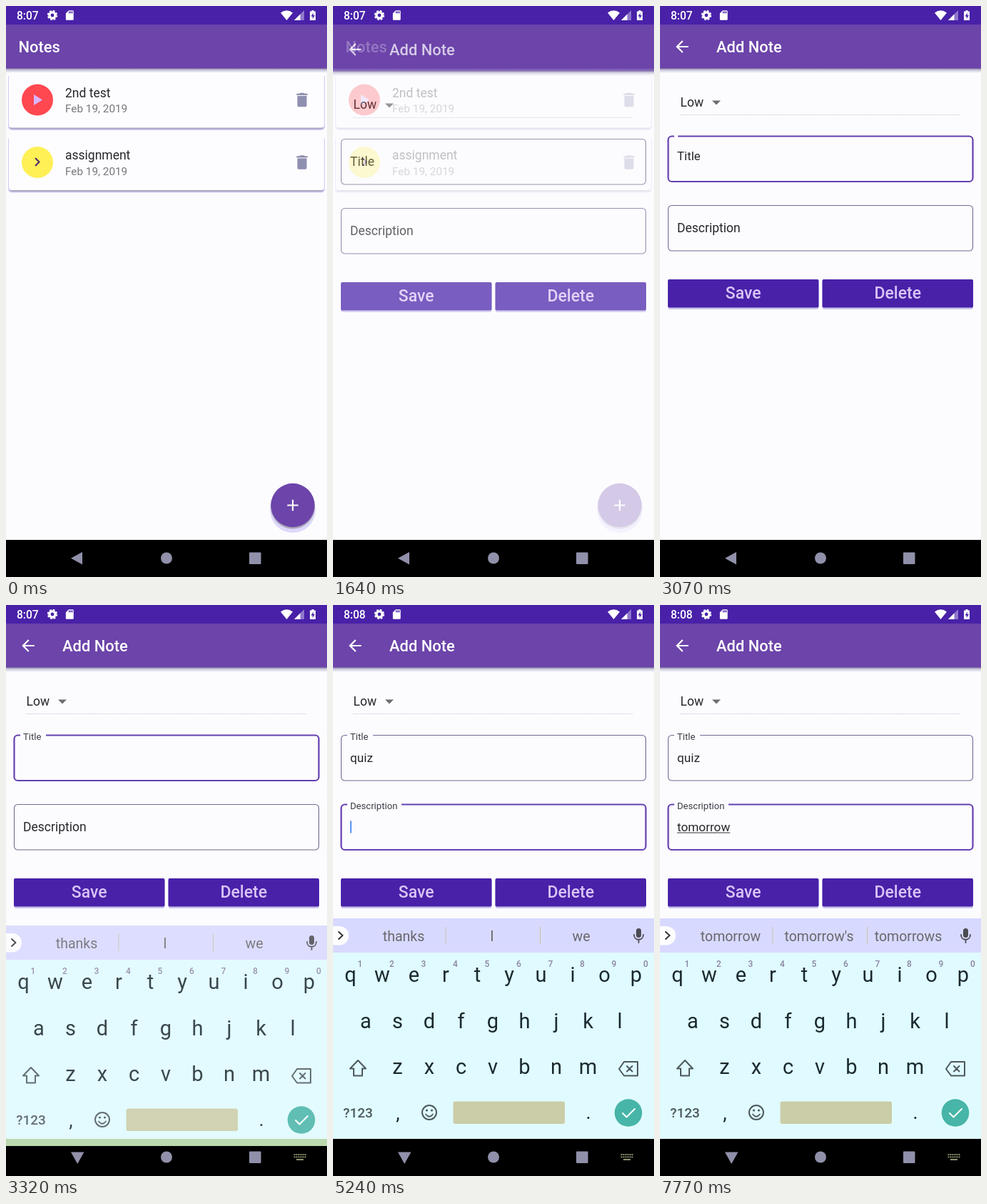
An HTML page that plays this animation: 450x800 px, repeating every 8000 ms.

```html
<!DOCTYPE html>
<html lang="en">
<head>
<meta charset="utf-8">
<title>Notes app</title>
<style>
html, body { margin: 0; width: 100%; height: 100%; overflow: hidden; background: #fcfcff; }
svg { display: block; width: 450px; height: 800px; }
text { font-family: Roboto, sans-serif; white-space: pre; }
.mid { text-anchor: middle; }
.med { font-weight: 500; }
.line { fill: none; stroke-linecap: round; stroke-linejoin: round; }
</style>
</head>
<body>
<svg id="stage" viewBox="0 0 450 800" xmlns="http://www.w3.org/2000/svg"></svg>
<script>
const LOOP = 8000;
const BAR = '#6c44aa', DARK = '#4821a8', PAPER = '#fcfcff', ICON = '#8f8fb0', INK = '#26262c';

const text = (x, y, size, str, fill, cls = '', extra = '') =>
  `<text x="${x}" y="${y}" font-size="${size}" fill="${fill}" class="${cls}" ${extra}>${str}</text>`;
const rect = (x, y, w, h, fill, extra = '') =>
  `<rect x="${x}" y="${y}" width="${w}" height="${h}" fill="${fill}" ${extra}/>`;
const disc = (x, y, r, fill, extra = '') =>
  `<circle cx="${x}" cy="${y}" r="${r}" fill="${fill}" ${extra}/>`;
const path = (d, fill, extra = '') => `<path d="${d}" fill="${fill}" ${extra}/>`;
const line = (d, color, width, extra = '') =>
  `<path class="line" d="${d}" stroke="${color}" stroke-width="${width}" ${extra}/>`;
// 24-unit icon centred on a point
const icon = (x, y, d, fill, s = 1.094) =>
  path(d, fill, `transform="translate(${x - 12 * s} ${y - 12 * s}) scale(${s})"`);

const TRASH = 'M6 19c0 1.1.9 2 2 2h8c1.1 0 2-.9 2-2V7H6v12zM19 4h-3.5l-1-1h-5l-1 1H5v2h14V4z';
const BACK = 'M20 11H7.83l5.59-5.59L12 4l-8 8 8 8 1.41-1.41L7.83 13H20v-2z';
const PLUS = 'M19 13h-6v6h-2v-6H5v-2h6V5h2v6h6v2z';
const CARD = 'M18 2h-8L4 8v12c0 1.1.9 2 2 2h12c1.1 0 2-.9 2-2V4c0-1.1-.9-2-2-2zm-6 6h-2V4h2v4zm3 0h-2V4h2v4zm3 0h-2V4h2v4z';

const appBar = (title, x) =>
  rect(0, 87, 450, 7, 'url(#shade)') + rect(0, 0, 450, 87.5, BAR) +
  text(x, 65, 21.9, title, '#fff', 'med');

const card = (y, title, color, mark) =>
  rect(3, y + 2, 444, 79, '#cfcaf3', 'rx="5"') +
  rect(5, y + 2, 440, 77.5, '#aaa6c0', 'rx="4"') +
  rect(4, y, 442, 77.5, '#fdfdff', 'rx="4"') +
  disc(44, y + 38.5, 22, color) + mark +
  text(83, y + 34.5, 17.5, title, INK) +
  text(83, y + 56, 15.3, 'Feb 19, 2019', '#77777c') +
  icon(415, y + 38.5, TRASH, ICON);

const notesPage = () =>
  rect(0, 0, 450, 800, PAPER) + appBar('Notes', 17.5) +
  card(93, '2nd test', '#ff4850', path('M39 124V139L51 131.500Z', '#d9b6ff')) +
  card(180.5, 'assignment', '#fff056', line('M41 213L46.500 218.500L41 224', '#55306a', 2.2, 'style="stroke-linecap:butt;stroke-linejoin:miter"')) +
  disc(402, 706, 32, '#dcd8fb') + disc(402, 701.5, 31, '#a9a4b8') +
  disc(402, 699.5, 30.7, BAR) +
  disc(402, 699.5, 0, '#fff', 'id="ripple"') +
  icon(402, 699.5, PLUS, '#fff');

const field = (id, y, label) =>
  `<rect id="${id}Box" x="11.5" y="${y}" width="427" height="63.500" rx="5" fill="none"/>` +
  rect(20, y - 3, 0, 6, PAPER, `id="${id}Gap"`) +
  text(0, 0, 17.5, label, INK, '', `id="${id}Label"`) +
  text(24, y + 37, 17.2, '', INK, '', `id="${id}Text"`) +
  rect(24, y + 39, 0, 1.1, '#44444a', `id="${id}Under"`) +
  rect(24, y + 23, 2, 17, '#5a92f2', `id="${id}Caret"`);

const button = (x, label) =>
  rect(x, 384, 211.5, 41, '#c9c3ea', 'rx="3"') +
  rect(x, 383, 211.5, 39.5, DARK, 'rx="2"') +
  text(x + 105.7, 410, 23, label, '#d9c4f6', 'mid med');

const addPage = () =>
  rect(0, 0, 450, 800, PAPER) + appBar('Add Note', 79) + icon(31, 57, BACK, '#fff') +
  text(28.5, 140.5, 17.5, 'Low', INK) + path('M73 132.500H85L79 138.500Z', '#6c6c72') +
  `<path d="M28 152.500H421" stroke="#cfcfe6" stroke-dasharray="2 1"/>` +
  field('title', 182.5, 'Title') + field('desc', 279.5, 'Description') +
  button(11, 'Save') + button(227.5, 'Delete');

function keyboard() {
  const ink = '#1b2a2e', soft = '#4c585c';
  const row = (keys, x, y) =>
    [...keys].map((k, i) => text(x + 44.5 * i, y, 29, k, ink, 'mid')).join('');
  const digits = [...'1234567890'].map((n, i) =>
    text(38 + 44.5 * i, 507, 12, n, '#8a84a0', 'mid med')).join('');
  const words = [99, 223, 348].map((x, i) =>
    text(x, 470.5, 19.5, '', '#68686e', 'mid', `id="word${i}"`)).join('');
  return rect(0, 439, 450, 48, '#d8d9ff') + rect(0, 487, 450, 272, '#e0fbff') +
    rect(-14, 450, 36, 26.5, '#fdfdff', 'rx="13"') + line('M8 458L13.500 463L8 468', '#333', 2) +
    rect(157.5, 451, 1, 24, '#c4c6aa') + rect(290, 451, 1, 24, '#c4c6aa') + words +
    rect(425, 453, 7, 13, '#4b4b52', 'rx="3.500"') +
    line('M422 462C422 471 435 471 435 462M428.500 469V473', '#4b4b52', 1.8) +
    digits + row('qwertyuiop', 24.5, 528) + row('asdfghjkl', 46, 592.5) + row('zxcvbnm', 90.5, 657) +
    line('M35 638L46 649.500H41V659.500H29V649.500H24Z', soft, 2) +
    line('M408 640H427V659.500H408L401 650ZM412 646L419.500 653.500M419.500 646L412 653.500', soft, 2) +
    text(35, 718, 19, '?123', soft, 'mid med') + text(91, 721, 27, ',', ink, 'mid') +
    disc(135, 711, 10, 'none', `stroke="${soft}" stroke-width="2"`) +
    disc(131.5, 708, 1.6, soft) + disc(138.5, 708, 1.6, soft) +
    line('M130 713.500Q135 720 140 713.500', soft, 1.8) +
    rect(168.5, 695.5, 156.5, 31.5, '#cbcda8', 'rx="3"') + text(358, 720, 27, '.', ink, 'mid') +
    disc(414, 711.5, 19.3, '#47b5a8') + line('M406 712L411.500 717.500L423 706', '#fff', 2);
}

const statusBar = () =>
  rect(0, 0, 450, 26, DARK) + text(15, 19, 15.6, '', '#fff', 'med', 'id="clock"') +
  disc(65, 13, 4.1, 'none', 'stroke="#fff" stroke-width="3.400"') +
  disc(65, 13, 6, 'none', 'stroke="#fff" stroke-width="2.400" stroke-dasharray="2.700 2.010"') +
  icon(89.3, 13, CARD, '#fff', .68) +
  path('M385 9.500Q393.500 3 402 9.500L393.500 20Z', '#fff') +
  path('M418 6V20H404Z', '#8f78cc') + path('M412.500 11.500V20H404Z', '#fff') +
  path('M426 7.500H428.500V6H431.500V7.500H434V20H426Z', '#fff') +
  path('M431 9.500L427.500 14.500H429.700V18L433 13H430.700Z', DARK);

function navBar() {
  let dots = '';
  for (let y = 0; y < 2; y++)
    for (let x = 0; x < 6; x++) dots += rect(403.5 + x * 3, 769 + y * 3.4, 2, 2, '#8e9270');
  return rect(0, 748, 450, 52, '#000') + rect(0, 748, 450, 0, '#bcd8ae', 'id="band"') +
    path('', '#9090aa', 'id="back"') + disc(225, 773.5, 8, '#9090aa') +
    rect(341, 765.5, 16.5, 16.5, '#9090aa', 'rx="1"') +
    `<g id="keysIcon">${dots}${rect(407, 776, 10, 2, '#8e9270')}</g>`;
}

document.getElementById('stage').innerHTML =
  `<defs><linearGradient id="shade" x2="0" y2="1"><stop stop-color="#85809a"/>` +
  `<stop offset=".45" stop-color="#d0cde2"/><stop offset="1" stop-color="${PAPER}"/></linearGradient></defs>` +
  `<g>${notesPage()}</g><g id="add">${addPage()}</g><g id="keys">${keyboard()}</g>` +
  statusBar() + navBar();

const el = {};
document.querySelectorAll('[id]').forEach(n => el[n.id] = n);
const set = (id, attrs) => { for (const k in attrs) el[id].setAttribute(k, attrs[k]); };
const show = (id, on) => set(id, { visibility: on ? 'visible' : 'hidden' });
const clamp = v => Math.min(1, Math.max(0, v));
const within = (t, ...spans) => spans.some(([a, b]) => t >= a && t < b);
const latest = (list, t) => list.filter(s => s[0] <= t).pop();

function bezier(x1, y1, x2, y2) {
  const at = (a, b, s) => 3 * (1 - s) * (1 - s) * s * a + 3 * (1 - s) * s * s * b + s * s * s;
  return x => {
    let lo = 0, hi = 1;
    for (let i = 0; i < 22; i++) {
      const m = (lo + hi) / 2;
      if (at(x1, x2, m) < x) lo = m; else hi = m;
    }
    return at(y1, y2, (lo + hi) / 2);
  };
}
const glide = bezier(.4, 0, .2, 1), easeIn = bezier(.42, 0, 1, 1);

const TITLE = [[0, ''], [3490, 'q'], [3570, 'qu'], [3660, 'qui'], [4070, 'quiz']];
const DESC = [[0, ''], [6650, 't'], [6990, 'to'], [7150, 'tom'], [7280, 'tomo'],
  [7610, 'tomor'], [7690, 'tomorr'], [7770, 'tomorrow']];
const WORDS = [
  [0, 'thanks', 'I', 'we'], [3490, 'q', 'que', 'Q'], [3570, 'quick', 'question', 'quite'],
  [3660, 'quick', 'quite', 'quit'], [4070, 'quiz', 'quizzes', 'Lornive'],
  [4900, 'thanks', 'I', 'we'], [6740, 'the', 'to', 'there'], [6990, 'to', 'too', 'tomorrow'],
  [7150, 'tom', 'tomb', 'tomorrow'], [7440, 'tomo', 'tomorrow', 'tomorrows'],
  [7610, 'tomorrow', "tomorrow's", 'tomorrows']];
// time, drop, opacity
const RISE = [[0, 60, 0], [3110, 60, .3], [3150, 36, .6], [3320, 10, .86], [3450, 0, 1]];

function pageProgress(t) {
  if (t < 1010) return clamp((t - 330) / 400);
  if (t < 1510) return clamp(1 - (t - 1010) / 290);
  return clamp((t - 1395) / 300);
}

function drawField(id, y, float, focus, gap, str, composing, caret) {
  set(id + 'Box', focus
    ? { stroke: '#6440b0', 'stroke-width': 2.2 }
    : { stroke: '#706b92', 'stroke-width': 1.1 });
  set(id + 'Gap', { width: gap * float });
  set(id + 'Label', {
    transform: `translate(24 ${y + 37.5 - 31.3 * float}) scale(${1 - .25 * float})`,
    fill: float > .5 ? '#3c3c46' : INK
  });
  el[id + 'Text'].textContent = str;
  const w = str ? el[id + 'Text'].getComputedTextLength() : 0;
  set(id + 'Under', { width: composing ? w : 0 });
  set(id + 'Caret', { x: 24 + w + (str ? .5 : 0) });
  show(id + 'Caret', caret);
}

function draw(t) {
  const p = pageProgress(t);
  set('add', { transform: `translate(0 ${200 * (1 - glide(p))})`, opacity: easeIn(p) });

  const r = clamp((t - 40) / 300);
  set('ripple', { r: 30.7 * r, opacity: t < 700 ? .22 * (1 - clamp((t - 340) / 200)) : 0 });

  const inTitle = t >= 3030 && t < 4780;
  drawField('title', 182.5, glide(clamp((t - 3030) / 200)), inTitle, 36,
    latest(TITLE, t)[1], inTitle, within(t, [3450, 3910], [4070, 4610]));
  drawField('desc', 279.5, glide(clamp((t - 4780) / 200)), t >= 4780, 76,
    latest(DESC, t)[1], true, within(t, [5080, 5780], [6280, 7770]));

  const [, drop, alpha] = latest(RISE, t);
  set('keys', { transform: `translate(0 ${drop})`, opacity: alpha });
  set('band', { height: alpha ? Math.min(drop, 10) : 0 });
  latest(WORDS, t).slice(1).forEach((w, i) => el['word' + i].textContent = w);

  const open = alpha > 0;
  show('keysIcon', open);
  set('back', { d: open ? 'M91 766.500H109.500L100.200 783Z' : 'M91 773.700L107 765V782.500Z' });
  el.clock.textContent = t < 5240 ? '8:07' : '8:08';
}

const start = performance.now();
function tick() {
  draw((performance.now() - start) % LOOP);
  requestAnimationFrame(tick);
}
tick();
</script>
</body>
</html>
```
